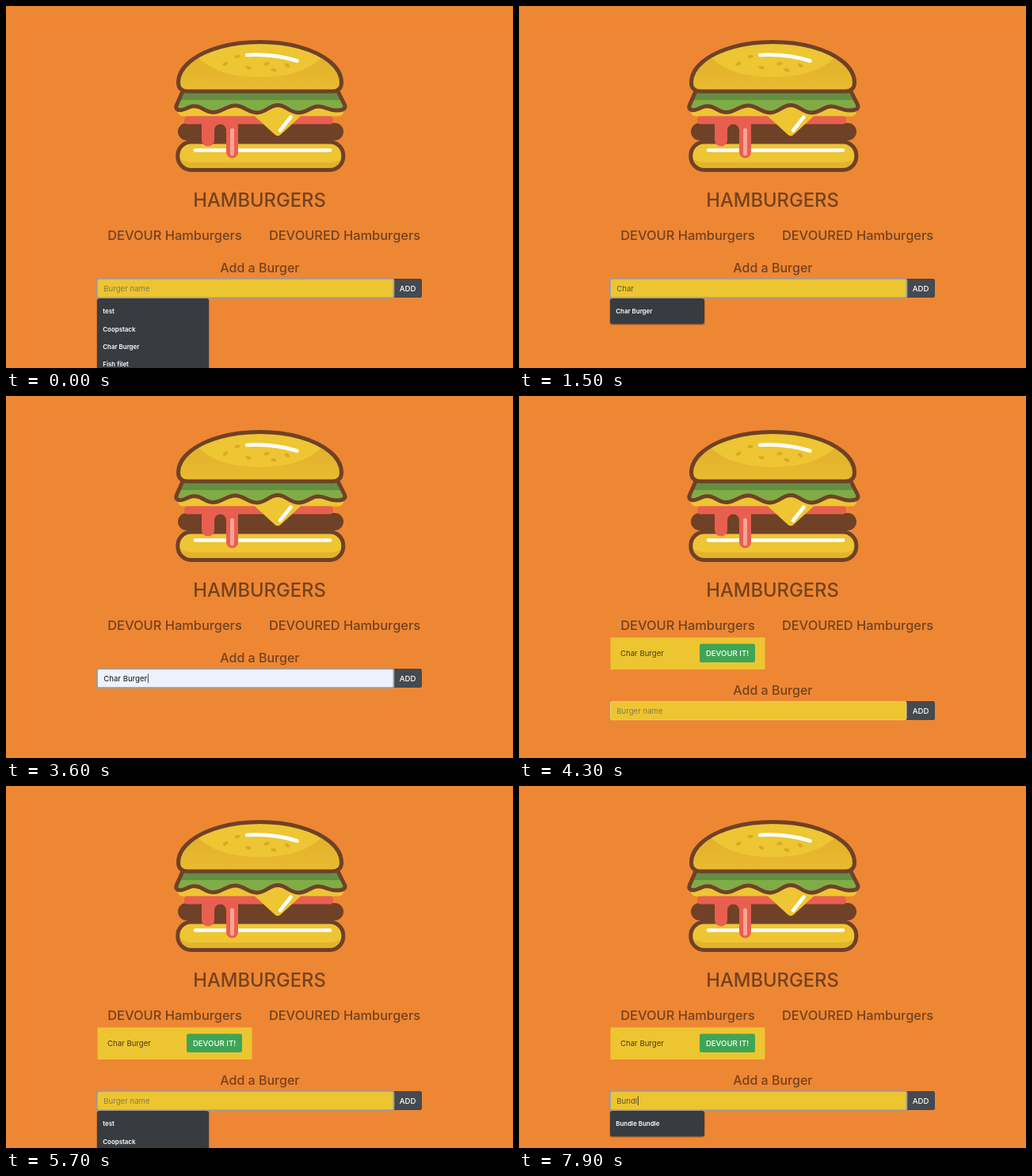
Write an HTML page that moves like this. It is 640 px wide and 458 px high and loops after 8 s.

```html
<!DOCTYPE html>
<html lang="en">
<head>
<meta charset="utf-8">
<title>Hamburgers</title>
<style>
  html, body { margin: 0; width: 100%; height: 100%; overflow: hidden; background: #ee8733; }
  svg { display: block; width: 640px; height: 458px; font-family: Inter, Roboto, sans-serif; }
  text { white-space: pre; }
  .heading { fill: #74421f; font-weight: 500; font-size: 16.4px; text-anchor: middle; }
  .title { font-size: 23.75px; }
  .label { font-size: 16px; }
  .small { font-size: 9.6px; }
  .button { fill: #fff; font-weight: 500; text-anchor: middle; }
  .item { fill: #fff; font-weight: 600; font-size: 7.9px; }
  .line { fill: none; stroke: #6f4127; stroke-width: 5; stroke-linejoin: round; stroke-linecap: round; }
  .shine { fill: none; stroke: #fff; stroke-width: 4.6; stroke-linecap: round; }
</style>
</head>
<body>
<svg viewBox="0 0 640 458">
  <defs>
    <path id="bun" d="M217.5 97C217.5 87 223 78 232 70.5C252 54 285 45.5 320.5 45.5C356 45.5 389 54 409 70.5C418 78 423.5 87 423.5 97C423.5 104 419 108 412 108H229C222 108 217.5 104 217.5 97Z"/>
    <path id="leaf" d="M223 108L215.5 125C213 131 218 133 224 131C231 128.5 235 125 243 127.5C252 131 256 136 266 134C276 131.5 281 125 291 126C301 127 306 135 317 135C328 135 332 125.5 343 125.5C354 125.5 358 135 369 135C380 135 385 127 394 127C403 127 407 132 416 132C424 132.5 429.5 130.5 427.5 125L419 108"/>
    <clipPath id="bunClip"><use href="#bun"/></clipPath>
    <clipPath id="leafClip"><use href="#leaf"/></clipPath>
    <linearGradient id="crust" x2="0" y2="1">
      <stop offset=".3" stop-color="#e3b02c"/>
      <stop offset="1" stop-color="#e9bb30"/>
    </linearGradient>
  </defs>

  <rect width="640" height="458" fill="#ee8733"/>

  <g id="burger">
    <rect x="217" y="148" width="209" height="22" rx="11" fill="#6f4127"/>
    <rect x="216.800" y="172" width="209" height="35.500" rx="17" fill="#eec532"/>
    <path d="M219 193Q226 198 238 198H406Q418 198 424 193Q421 206 408 206H235Q222 206 219 193Z" fill="#e4b32d"/>
    <rect class="line" x="216.800" y="172" width="209" height="35.500" rx="17"/>
    <path class="shine" d="M239 182.500H409"/>

    <rect x="217" y="125" width="209" height="14.500" rx="6" fill="#eec532"/>
    <path d="M229 139.500H409Q413 139.500 413 144.500T409 149.500H293V185a7.500 7.500 0 0 1-15 0V157a7.500 7.500 0 0 0-15 0V169.500a8 8 0 0 1-16 0V149.500H229Q225 149.500 225 144.500T229 139.500Z" fill="#e85f50"/>
    <path d="M285.500 157V187" fill="none" stroke="#f5a595" stroke-width="5" stroke-linecap="round"/>
    <path d="M313 138.500L338 161.500Q343 167 348 161.500L373 138.500Z" fill="#eec532"/>
    <path class="shine" d="M359.500 140.500L346 157.500"/>

    <use href="#leaf" fill="#80ac46"/>
    <rect x="212" y="108" width="220" height="11" fill="#648f43" clip-path="url(#leafClip)"/>
    <use href="#leaf" class="line"/>

    <use href="#bun" fill="url(#crust)"/>
    <path d="M230 40H412L398 66Q372 90 320 90T243 66Z" fill="#eec532" clip-path="url(#bunClip)"/>
    <g id="seeds" fill="#d9a92c"></g>
    <path class="shine" d="M304 62Q338 60 367.500 69.500"/>
    <use href="#bun" class="line"/>
  </g>

  <text class="heading title" x="320" y="254">HAMBURGERS</text>
  <text class="heading" x="213" y="296.300">DEVOUR Hamburgers</text>
  <text class="heading" x="427.500" y="296.300">DEVOURED Hamburgers</text>

  <g id="row">
    <rect x="115.500" y="305.500" width="195" height="40.500" fill="#edc531"/>
    <text class="small" x="128" y="329" fill="#4b3a1d">Char Burger</text>
    <rect x="228" y="313.500" width="70" height="23.500" rx="2.500" fill="#3fa556"/>
    <text class="small button" x="263" y="328.700">DEVOUR IT!</text>
  </g>

  <g id="form">
    <text class="heading label" x="320.400" y="336.500">Add a Burger</text>
    <path d="M489 345H522.500Q525 345 525 347.500V366.500Q525 369 522.500 369H489Z" fill="#454a50"/>
    <text class="small button" x="507" y="360.700">ADD</text>
    <rect id="ring" x="114.500" y="345" width="375" height="24.500" rx="2.500" fill="none" stroke="#a3988e" stroke-width="1.600"/>
    <rect id="field" x="115.500" y="345.700" width="373.500" height="23" rx="2" stroke-width="1"/>
    <text id="entry" class="small" x="123.300" y="360.800"></text>
    <rect id="caret" y="351.500" width=".9" height="11.500" fill="#333"/>
    <g id="menu">
      <rect id="shade" x="114" y="370" rx="3.500" fill="#8a4c1c" opacity=".35"/>
      <rect id="panel" x="115" y="370" rx="3" fill="#383c40"/>
      <rect id="pick" x="115" y="375" width="119" height="22" fill="#565b60"/>
      <g id="items"></g>
    </g>
  </g>
</svg>
<script>
const $ = id => document.getElementById(id);
const LOOP = 8000, BLINK = 450;
const foods = ['test', 'Coopstack', 'Char Burger', 'Fish filet'];
const char = ['Char Burger'], bundle = ['Bundle Bundle'];

// Each step lists only what changes; everything else carries over.
const steps = [
  { at: 0, text: '', menu: foods, focus: true, auto: false, pick: false, added: false },
  { at: 300, text: 'C', menu: char },
  { at: 600, text: 'Ch' },
  { at: 800, text: 'Cha' },
  { at: 1000, text: 'Char' },
  { at: 1900, text: 'Char Burger', auto: true, pick: true },
  { at: 2300, menu: [], pick: false },
  { at: 3800, text: '', auto: false, focus: false, added: true },
  { at: 4900, focus: true },
  { at: 5300, menu: foods },
  { at: 6100, text: 'B', menu: bundle },
  { at: 6600, text: 'Bu' },
  { at: 7000, text: 'Bun' },
  { at: 7400, text: 'Bund' },
  { at: 7700, text: 'Bundl' }
];
steps.forEach((s, i) => { steps[i] = { ...steps[i - 1], ...s }; });

function add(parent, tag, attrs, text = '') {
  const el = document.createElementNS('http://www.w3.org/2000/svg', tag);
  for (const key in attrs) el.setAttribute(key, attrs[key]);
  el.textContent = text;
  parent.append(el);
}

function set(id, attrs) {
  for (const key in attrs) $(id).setAttribute(key, attrs[key]);
}

const show = (id, on) => set(id, { visibility: on ? 'visible' : 'hidden' });

[[277, 73, -30], [292, 64, -10], [306, 78, 20], [329, 73, -15], [338, 81, 15], [355, 75, 35]]
  .forEach(([x, y, turn]) => add($('seeds'), 'ellipse', {
    rx: 3.6, ry: 2, transform: `translate(${x} ${y}) rotate(${turn})`
  }));

function drawMenu(list, pick) {
  const full = list.length > 1;
  const width = full ? 141 : 119, height = full ? 190 : 32.5;
  set('panel', { width, height });
  set('shade', { width: width + 2, height: height + 1.5 });
  $('items').replaceChildren();
  list.forEach((name, i) => add($('items'), 'text', { class: 'item', x: 122.3, y: 389.2 + i * 22.4 }, name));
  $('menu').setAttribute('display', list.length ? 'inline' : 'none');
  set('pick', { display: pick ? 'inline' : 'none' });
}

let current;
function apply(s) {
  current = s;
  $('row').setAttribute('display', s.added ? 'inline' : 'none');
  set('form', { transform: `translate(0 ${s.added ? 41 : 0})` });
  show('ring', s.focus);
  set('field', { fill: s.auto ? '#edf2fc' : '#edc531', stroke: s.focus ? '#9fa7ad' : '#e8ce83' });
  $('entry').textContent = s.text || 'Burger name';
  set('entry', { fill: s.auto ? '#151515' : s.text ? '#5a5438' : '#887a48' });
  if (s.text) set('caret', { x: 124 + $('entry').getComputedTextLength() });
  drawMenu(s.menu, s.pick);
}

const start = performance.now();
function frame(now) {
  const t = Math.max(0, now - start) % LOOP;
  const s = steps.findLast(step => step.at <= t);
  if (s !== current) apply(s);
  show('caret', s.focus && s.text && Math.floor((t - s.at) / BLINK) % 2 === 0);
  requestAnimationFrame(frame);
}
apply(steps[0]);
requestAnimationFrame(frame);
</script>
</body>
</html>
```
